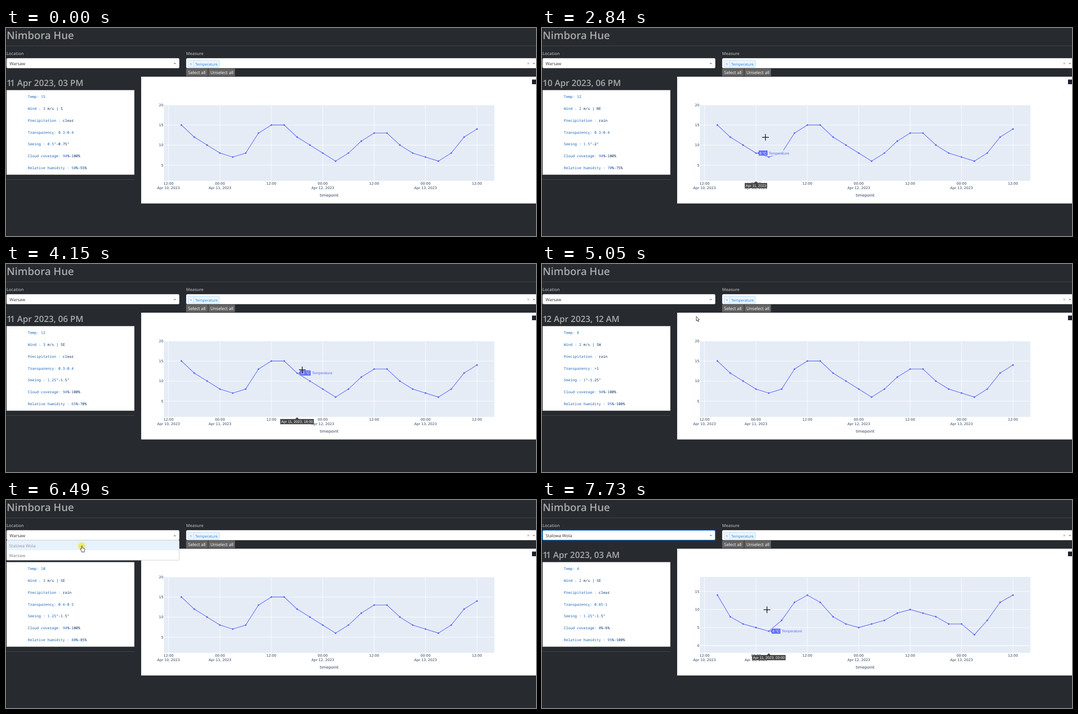
An HTML page for the animation above (7990 ms loop, 1192 by 470 pixels).

```html
<!DOCTYPE html>
<html lang="en">
<head>
<meta charset="utf-8">
<title>Forecast dashboard</title>
<style>
  html, body { margin: 0; width: 100%; height: 100%; overflow: hidden; background: #272b30; }
  svg { display: block; width: 100%; height: 100%; }
  text { font-family: "Open Sans", "Noto Sans", sans-serif; font-size: 9.6px; text-rendering: geometricPrecision; white-space: pre; }
  .head { fill: #aaa; font-weight: 600; }
  .mono { font-family: "Noto Sans Mono", "DejaVu Sans Mono", monospace; font-size: 8.2px; fill: #032f62; }
  .mono tspan { fill: #1660bb; }
  .axis { font-family: "DejaVu Sans", sans-serif; font-size: 7.85px; fill: #2a3f5f; text-anchor: middle; }
  .tip { font-family: "Liberation Sans", Arial, sans-serif; font-size: 8.2px; }
</style>
</head>
<body>
<svg viewBox="0 0 1192 470"><g id="page"></g><g id="live"></g></svg>
<script>
const LOOP = 7990, STEP = 68, LAG = 70;
const OPEN = 5530, PICK = 6560, SWAP = 6760;
const BLUE = '#636efa';

// three-hourly temperatures; zero and unit place them on the y axis
const cities = [
  { name: 'Warsaw', zero: 355, unit: 9.05, cloud: '94%-100%',
    temps: [15, 12, 10, 8, 7, 8, 13, 15, 15, 12, 10, 8, 6, 8, 11, 13, 13, 10, 8, 7, 6, 8, 12, 14] },
  { name: 'Stalowa Wola', zero: 329, unit: 8.15, cloud: '0%-6%',
    temps: [14, 8, 6, 5, 4, 7, 12, 14, 12, 8, 6, 5, 6, 7, 9, 10, 9, 8, 6, 6, 3, 7, 12, 14] }
];

// time, point, wind, precipitation, transparency, seeing, lowest humidity
const reports = [
  [0, 8, '3 m/s | S', 'clear', '0.3-0.4', '0.5"-0.75"', 50],
  [1890, 1, '2 m/s | NE', 'rain', '0.3-0.4', '1.5"-2"', 70],
  [2980, 4, '2 m/s | SE', 'rain', '0.4-0.5', '1.25"-1.5"', 85],
  [3820, 9, '3 m/s | SE', 'clear', '0.3-0.4', '1.25"-1.5"', 65],
  [4420, 11, '2 m/s | SW', 'rain', '>1', '1"-1.25"', 95],
  [5120, 2, '3 m/s | SE', 'rain', '0.4-0.5', '1.25"-1.5"', 80],
  [7530, 1, '2 m/s | SE', 'clear', '0.85-1', '1.25"-1.5"', 80],
  [7725, 4, '2 m/s | SE', 'clear', '0.85-1', '1.25"-1.5"', 95]
];
const labels = ['Temp:', 'Wind :', 'Precipitation :', 'Transparency:', 'Seeing :', 'Cloud coverage:', 'Relative humidity :'];

// pointer moves: start, end, x and y reached
const moves = [
  [660, 1210, 401, 427], [1420, 1890, 412.4, 207], [2490, 2980, 519.2, 254.4],
  [3330, 3820, 661, 238.4], [4150, 4420, 712, 245], [4770, 5050, 347, 118],
  [5120, 5260, 200, 82], [5800, 6420, 171, 103], [6830, 7530, 425, 246], [7600, 7650, 506, 248]
];

const rect = (x, y, w, h, fill, more = '') => `<rect x="${x}" y="${y}" width="${w}" height="${h}" fill="${fill}" ${more}/>`;
const text = (x, y, s, more = '') => `<text x="${x}" y="${y}" ${more}>${s}</text>`;
const line = (x1, y1, x2, y2, color, w = 1) => `<path d="M${x1} ${y1}L${x2} ${y2}" stroke="${color}" stroke-width="${w}"/>`;
const shape = (d, fill, more = '') => `<path d="${d}" fill="${fill}" ${more}/>`;
const cityAt = t => cities[+(t >= SWAP)];
const pointX = i => 394.5 + 28.9 * i;
const tempY = (city, v) => city.zero - city.unit * v;
const inPlot = ([x, y]) => x > 355 && x < 1098 && y > 174 && y < 346;
const pad = n => String(n).padStart(2, '0');

function clock(i) {
  const h = 15 + 3 * i;
  return { day: 10 + Math.floor(h / 24), hour: h % 24 };
}

// eased, moving in steps as a screen recording does
function pointer(t) {
  let x = 900, y = 480;
  for (const [from, to, toX, toY] of moves) {
    if (t < from) break;
    const gaps = Math.round((to - from) / STEP);
    const p = Math.min(1, (Math.floor((t - from) / (to - from) * gaps) + 1) / (gaps + 1));
    const e = p * p * (3 - 2 * p);
    x += (toX - x) * e;
    y += (toY - y) * e;
  }
  return [x, y];
}

// nearest point, a moment behind the pointer
function hovered(t) {
  const at = pointer(t - LAG);
  if (!inPlot(at) || !inPlot(pointer(t))) return -1;
  return Math.max(0, Math.round((at[0] - pointX(0)) / 28.9));
}

function page() {
  const button = (x, w, s) => rect(x, 91.7, w, 17, '#636363') +
    text(x + 4.6, 104, s, 'fill="#fff" style="font-size:9.7px"');
  return rect(0, 0, 1, 470, '#1b1e22') +
    text(1.5, 25, 'Nimbora Hue', 'class="head" style="font-size:23.4px"') +
    line(1, 40.5, 1192, 40.5, '#484c51') + line(1, 342.5, 289, 342.5, '#484c51') +
    text(1, 61, 'Location', 'class="head" style="font-size:9.4px"') +
    text(405, 61, 'Measure', 'class="head" style="font-size:9.4px"') +
    rect(405.5, 68.5, 800, 22, '#fff', 'stroke="#ccc" rx="2.5"') +
    rect(409.5, 73, 70.5, 16, '#ebf5ff', 'stroke="#b8dbfa" rx="1.5"') + line(422.5, 73, 422.5, 89, '#b8dbfa') +
    text(413.8, 84, '×', 'fill="#1a80e0" style="font-size:7.5px"') +
    text(425.8, 84.8, 'Temperature', 'fill="#1a80e0" style="font-size:8.4px"') +
    text(1171.5, 84, '×', 'fill="#999" style="font-size:11px"') + shape('M1184 79h6.4l-3.2 3.2z', '#999') +
    button(405, 49, 'Select all') + button(455.2, 59.8, 'Unselect all') +
    rect(1.3, 140.3, 287.4, 191, '#fff', 'stroke="#aaa" stroke-width=".6"') + rect(304, 110, 888, 286.5, '#fff') +
    rect(1183, 116.5, 9, 10.5, '#1c1f2b');
}

function report(t) {
  const [time, i, wind, rain, clarity, seeing, damp] = reports.filter(r => r[0] <= t).pop();
  const city = cityAt(time), { day, hour } = clock(i);
  const values = [city.temps[i], wind, rain, clarity, seeing, city.cloud, `${damp}%-${damp + 5}%`];
  const date = `${day} Apr 2023, ${pad(hour % 12 || 12)} ${hour < 12 ? 'AM' : 'PM'}`
    .replace(/1([12])/g, (m, n) => `1<tspan dx="${n == 1 ? -3.5 : -2}">${n}</tspan>`);
  return text(1.5, 131, date, 'class="head" style="font-size:19.3px"') + values.map((v, n) =>
    text(49, 158.4 + 26.73 * n, `<tspan>${labels[n]}</tspan> ` +
      String(v).replace(/^\d[\d.]*(-\d[\d.]*$)?/, '<tspan>$&</tspan>'), 'class="mono"')).join('');
}

function chart(city) {
  let s = rect(355, 174, 743.5, 171.5, '#e5ecf6');
  for (let i = 0; i < 7; i++) {
    const x = 365.6 + 115.6 * i;
    s += line(x, 174, x, 345.5, '#fff') + text(x, 354, i % 2 ? '00:00' : '12:00', 'class="axis"');
    if (i % 2 || !i) s += text(x, 364, `Apr ${10 + (i + 1 >> 1)}, 2023`, 'class="axis"');
  }
  for (let v = 0; v <= 20; v += 5) {
    const y = tempY(city, v);
    if (y < 173.9 || y > 345) continue;
    s += line(355, y, 1098.5, y, '#fff', v ? 1 : 1.5) +
      text(354, y + 2.8, v, 'class="axis" style="text-anchor:end"');
  }
  s += text(726.8, 381, 'timepoint', 'class="axis" style="font-size:8.8px"');
  const points = city.temps.map((v, i) => [pointX(i), tempY(city, v)]);
  s += `<polyline points="${points.join(' ')}" fill="none" stroke="${BLUE}" stroke-width="1.3"/>`;
  return s + points.map(([x, y]) => `<circle cx="${x}" cy="${y}" r="1.95" fill="${BLUE}"/>`).join('');
}

function tooltip(i, city) {
  if (i < 0) return '';
  const x = pointX(i), v = city.temps[i], y = tempY(city, v), w = v > 9 ? 25 : 20.5;
  const { day, hour } = clock(i), half = hour ? 38 : 25.4;
  const when = `Apr ${day}, 2023` + (hour ? `, ${pad(hour)}:00` : '');
  return rect(x + 5.5 + w, y - 6.5, 51, 13, '#e5ecf6', 'opacity=".8"') +
    shape(`M${x + 2.5} ${y}l3.5 -3v-3.2h${w}v12.4h${-w}v-3.2z`, BLUE, 'stroke="#fff" stroke-width=".5"') +
    text(x + 8, y + 3, v + ' °C', 'class="tip" fill="#fff"') +
    text(x + 8.3 + w, y + 3, 'Temperature', `class="tip" fill="${BLUE}"`) +
    shape(`M${x} 346l4 4h${half - 4}v12.3h${-2 * half}v-12.3h${half - 4}z`, '#444', 'stroke="#fff" stroke-width=".5"') +
    text(x, 359.2, when, 'class="tip" fill="#fff" text-anchor="middle"');
}

function picker(t) {
  const open = t >= OPEN && t < PICK, done = t >= PICK, over = pointer(t)[1] > 91;
  let s = done ? rect(0, 67, 391, 25, 'none', 'stroke="#007eff" stroke-opacity=".12" stroke-width="2" rx="3.5"') : '';
  s += rect(1.5, 68.5, 388, 22, '#fff', `stroke="${done ? '#007eff' : '#ccc'}" rx="2.5"`) +
    text(8, 83.5, cities[+done].name, 'fill="#333"') +
    shape(open ? 'M376.5 82h6.4l-3.2 -3.2z' : 'M376.5 79h6.4l-3.2 3.2z', '#999');
  if (open)
    s += rect(1.5, 91, 388, 45, '#fff', 'stroke="#ccc" rx="1.5"') +
      rect(2, over ? 91.5 : 113.5, 387, 22, '#e6f2fc') +
      text(7, 106.5, cities[1].name, 'fill="#999"') +
      text(7, 128.7, cities[0].name, 'fill="#999" font-weight="600"');
  return s;
}

function cursor(t) {
  const [x, y] = pointer(t);
  const outline = 'stroke="#111" stroke-width=".9" stroke-linejoin="round"';
  const clicked = [OPEN, PICK].some(c => t >= c - 2 * STEP && t < c);
  const s = clicked ? `<circle cx="${x - 1}" cy="${y + 1}" r="8" fill="#f2e72e" opacity=".7"/>` : '';
  if (inPlot([x, y]))
    return s + line(x - 7.5, y, x + 7.5, y, '#000', 1.4) + line(x, y - 7.5, x, y + 7.5, '#000', 1.4);
  if (t >= OPEN && t < PICK && y > 91)
    return s + shape(`M${x - 1.5} ${y + 1.2}q1.2 -1.6 2.4 0v4.3l4.2 1q1.3 .4 1.1 1.8l-.9 4v2.2h-6v-1.8l-3.2 -4.2q-.2 -1.7 1.4 -1.2l1 .9z`, '#fff', outline);
  return s + shape(`M${x} ${y + .5}v10l2.3 -2l1.6 3.6l1.6 -.7l-1.5 -3.5h3z`, '#fff', outline);
}

document.getElementById('page').innerHTML = page();
const live = document.getElementById('live');
const start = performance.now();
let shown = '';

function tick() {
  const t = (performance.now() - start) % LOOP, city = cityAt(t);
  const next = report(t) + chart(city) + tooltip(hovered(t), city) + picker(t) + cursor(t);
  if (next !== shown) live.innerHTML = shown = next;
  requestAnimationFrame(tick);
}
tick();
</script>
</body>
</html>
```
